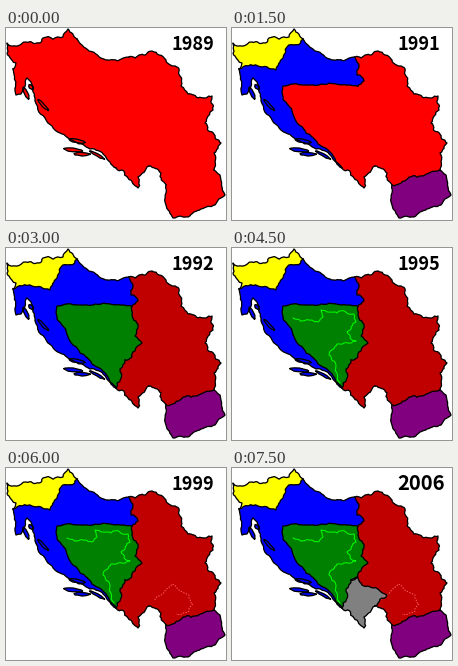
Write a matplotlib script that moves like this. It is 220 by 192 pixels and loops after 8 s.

```python
import numpy as np
import matplotlib.pyplot as plt
from matplotlib.animation import FuncAnimation

W, H, DPI = 220, 192, 100
STEP = 500                      # ms per frame
FRAMES = 16
PX = 72 / DPI                   # one pixel in points

RED, DARK_RED = "#ff0000", "#c00000"
YELLOW, BLUE, GREEN = "#ffff00", "#0000ff", "#008000"
PURPLE, GREY, LIME, PINK = "#800080", "#808080", "#00ff00", "#ff5a5a"

rng = np.random.default_rng(5)


def rugged(a, b, rough):
    """Points from a up to b, made jagged by seeded midpoint displacement."""
    d = b - a
    if np.hypot(*d) < 3:
        return [a]
    side = np.array([-d[1], d[0]])
    mid = (a + b) / 2 + side * rng.uniform(-rough, rough)
    return rugged(a, mid, rough) + rugged(mid, b, rough)


def arc(*points, rough=0.2):
    pts = np.array(points, float)
    line = [p for a, b in zip(pts, pts[1:]) for p in rugged(a, b, rough)]
    return np.array(line + [pts[-1]])


def isle(x, y, length, angle, width=3.4):
    """Lens-shaped island around (x, y)."""
    t = np.linspace(0, 2 * np.pi, 13)
    u, v = length / 2 * np.cos(t), width / 2 * np.sin(t)
    v += rng.uniform(-0.4, 0.4, t.size)
    c, s = np.cos(np.radians(angle)), np.sin(np.radians(angle))
    return np.column_stack([x + u * c - v * s, y + u * s + v * c])


# Points where three regions or a border and the outline meet
ISTRIA, DRAVA, DANUBE, SAVA = (7, 41), (71, 11), (123, 29), (126, 58)
DRINA, BAY, LAKE = (119, 112), (110, 140), (143, 138)
WEST, EAST = (160, 157), (208, 142)

ARCS = {
    "slo_out": arc(ISTRIA, (10, 35), (3, 28), (1, 15), (20, 14), (33, 15),
                   (37, 10), (57, 9), (62, 1), DRAVA),
    "slo_cro": arc(DRAVA, (55, 19), (51, 30), (44, 42), (26, 38), ISTRIA),
    "cro_n": arc(DRAVA, (83, 23), (100, 32), DANUBE, rough=0.1),
    "cro_ser": arc(DANUBE, (127, 39), (125, 47), (132, 53), SAVA),
    "cro_bos": arc(SAVA, (104, 56), (75, 57), (61, 56), (51, 58), (51, 71),
                   (64, 93), (86, 116), BAY, rough=0.1),
    "coast": arc(BAY, (84, 121), (54, 105), (39, 90), (29, 70), (25, 54),
                 (21, 50), (15, 66), (10, 67), ISTRIA, rough=0.12),
    "bos_ser": arc(SAVA, (126, 67), (132, 80), (129, 88), (136, 95),
                   (129, 103), DRINA),
    "bos_mne": arc(DRINA, (114, 121), BAY),
    "mne_out": arc(BAY, (122, 150), (132, 160), (132, 149), LAKE),
    "mne_ser": arc(DRINA, (125, 109), (136, 118), (155, 127), LAKE),
    "ser_alb": arc(LAKE, (155, 145), WEST),
    "ser_mac": arc(WEST, (174, 152), (189, 148), EAST),
    "ser_out": arc(DANUBE, (146, 23), (160, 32), (174, 48), (182, 66),
                   (206, 68), (207, 82), (199, 95), (215, 115), (208, 125),
                   EAST),
    "mac_out": arc(EAST, (214, 147), (219, 167), (209, 177), (195, 181),
                   (182, 189), (167, 190), (160, 177), WEST, rough=0.12),
}
ISLES = [isle(20, 65, 13, 65), isle(25, 59, 6, 50), isle(37, 77, 15, 45, 2.5),
         isle(71, 113, 16, 10), isle(67, 122, 19, 8), isle(76, 126, 16, 2),
         isle(91, 127, 17, 28, 2.5)]
ENTITY = arc((61, 70), (72, 73), (86, 74), (91, 69), (89, 62), (105, 65),
             (122, 66), (124, 74), (115, 84), (124, 93), (105, 96), (97, 107),
             (104, 118), (108, 135))
PROVINCE = arc((149, 132), (158, 124), (166, 116), (174, 123), (187, 136),
               (183, 143), (170, 146))


def ring(*names):
    """Join arcs into a closed outline; a leading '-' walks one backwards."""
    return np.vstack([ARCS[n[1:]][::-1] if n[0] == "-" else ARCS[n]
                      for n in names])


OUTER = ["slo_out", "cro_n", "ser_out", "mac_out", "ser_alb", "mne_out", "coast"]
REGIONS = {
    "all": ring("slo_out", "cro_n", "ser_out", "mac_out", "-ser_alb",
                "-mne_out", "coast"),
    "slo": ring("slo_out", "slo_cro"),
    "cro": ring("cro_n", "cro_ser", "cro_bos", "coast", "-slo_cro"),
    "bos": ring("bos_ser", "bos_mne", "-cro_bos"),
    "mac": ring("mac_out", "ser_mac"),
    "mne": ring("mne_out", "-mne_ser", "bos_mne"),
}

# Start in ms, label, label size in px, base colour, new regions, new borders
STAGES = [
    (0, "1989", 18.2, RED, {}, []),
    (1500, "1991", 18.2, RED, {"slo": YELLOW, "cro": BLUE, "mac": PURPLE},
     ["slo_cro", "cro_ser", "cro_bos", "ser_mac"]),
    (3000, "1992", 18.2, DARK_RED, {"bos": GREEN}, ["bos_ser", "bos_mne"]),
    (4500, "1995", 18.2, DARK_RED, {}, []),
    (6000, "1999", 18.2, DARK_RED, {}, []),
    (7500, "2006", 20.2, DARK_RED, {"mne": GREY}, ["mne_ser"]),
]

fig = plt.figure(figsize=(W / DPI, H / DPI), dpi=DPI, facecolor="white")
ax = fig.add_axes([0, 0, 1, 1])


def stroke(pts, color="black", width=1.3, **kw):
    ax.plot(*pts.T, color=color, lw=width * PX, solid_joinstyle="round", **kw)


def fill(pts, color):
    ax.fill(*pts.T, color=color, lw=0)


def draw(i):
    ax.clear()
    ax.set(xlim=(0, W), ylim=(H, 0))
    ax.axis("off")
    now = i * STEP
    past = [s for s in STAGES if s[0] <= now]
    _, label, size, base, _, _ = past[-1]

    colors = {"all": base}
    borders = list(OUTER)
    for stage in past:
        colors.update(stage[4])
        borders += stage[5]
    for name, color in colors.items():
        fill(REGIONS[name], color)
    for shape in ISLES:
        fill(shape, colors.get("cro", base))
        stroke(shape)
    if now >= 4500:
        stroke(ENTITY, LIME, 1)
    if now >= 6000:
        stroke(PROVINCE, PINK, 1, ls=(0, (1.4, 1.4)))
    for name in borders:
        stroke(ARCS[name])
    ax.text(165.5, 21.5, label, family="Noto Sans CJK JP", weight="bold",
            size=size * PX, va="baseline", ha="left")
    return []


anim = FuncAnimation(fig, draw, frames=FRAMES, interval=STEP,
                     init_func=lambda: [], repeat=True, repeat_delay=0)
plt.show()
```
